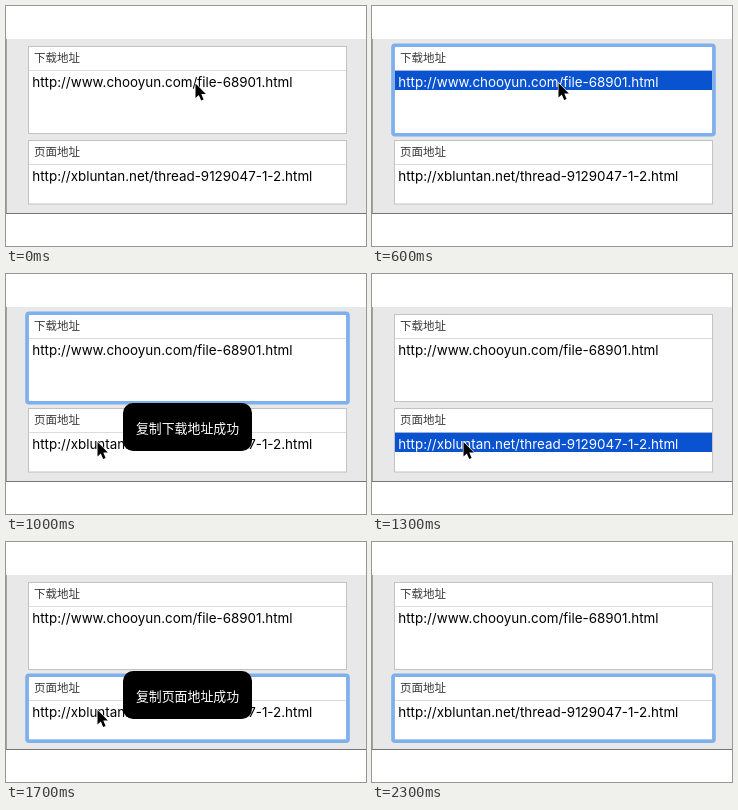
An HTML page that plays this animation: 360 px wide and 240 px high, repeating every 2.4 s.

```html
<!DOCTYPE html>
<html lang="zh-CN">
<head>
<meta charset="utf-8">
<style>
html, body { margin: 0; width: 100%; height: 100%; overflow: hidden; background: #fff; }
svg { display: block; width: 100vw; height: 100vh; }
text { white-space: pre; }
.panel { fill: #fff; stroke: #c2c2c2; }
.rule { stroke: #dcdcdc; }
.label { font: 11.5px "Noto Sans CJK SC", "Noto Sans CJK", sans-serif; fill: #3a3a3a; }
.url { font: 13.4px Inter, "Open Sans", sans-serif; fill: #000; }
.row { fill: #0a53d0; }
.ring { fill: none; stroke: #7fb0ee; stroke-width: 3.6; }
.toast { font: 500 12.9px "Noto Sans CJK SC", "Noto Sans CJK", sans-serif; fill: #fff; text-anchor: middle; }
</style>
</head>
<body>
<svg viewBox="0 0 360 240">
  <rect y="33" width="360" height="174" fill="#e8e8e8"/>
  <rect y="33" width="1" height="175" fill="#a3a3a3"/>
  <rect y="207" width="360" height="1" fill="#747474"/>
  <g id="panels"></g>
  <g id="toast">
    <rect x="117" y="129" width="129" height="48" rx="10"/>
    <text id="message" class="toast" x="181.5" y="158.7"></text>
  </g>
  <path id="cursor" d="M0 0V14.6L3.3 11.5L5.7 17L8.1 16L5.8 10.6H10.4Z" stroke="#fff" stroke-width="1.2" stroke-linejoin="round" paint-order="stroke"/>
</svg>
<script>
const LOOP = 2400, STEP = 100;
const $ = id => document.getElementById(id);

const panels = [
  { top: 40.5, height: 87, label: "下载地址", url: "http://www.chooyun.com/file-68901.html",
    ring: [200, 1300], row: [500, 800], toast: [800, 1300] },
  { top: 134.5, height: 63.5, label: "页面地址", url: "http://xbluntan.net/thread-9129047-1-2.html",
    ring: [1400, LOOP], row: [1300, 1500], toast: [1500, 2000] }
];

// Cursor tip: time, x, y
const path = [
  [0, 189.5, 77.5], [300, 191.5, 79], [600, 186.5, 77],
  [700, 186.5, 77], [1000, 91.5, 168], [LOOP, 91.5, 168]
];

function panelMarkup({ top, height, label, url }) {
  const rule = top + 24;
  return `<rect class="panel" x="22.5" y="${top}" width="318" height="${height}"/>
    <path class="rule" d="M23 ${rule}H340"/>
    <text class="label" x="28" y="${top + 15.9}">${label}</text>
    <rect class="row" x="23" y="${rule + 0.2}" width="317" height="19.3"/>
    <text class="url" x="26.3" y="${top + 40}">${url}</text>
    <rect class="ring" x="21" y="${top - 1.3}" width="321" height="${height + 2.6}" rx="2"/>`;
}

for (const panel of panels) {
  const g = document.createElementNS("http://www.w3.org/2000/svg", "g");
  g.innerHTML = panelMarkup(panel);
  $("panels").append(g);
  panel.parts = {
    row: g.querySelector(".row"),
    url: g.querySelector(".url"),
    ring: g.querySelector(".ring")
  };
}

const within = (t, [from, to]) => t >= from && t < to;
const show = (node, on) => node.setAttribute("visibility", on ? "visible" : "hidden");

function cursorAt(t) {
  const i = path.findIndex(p => p[0] > t);
  const [t0, x0, y0] = path[i - 1], [t1, x1, y1] = path[i];
  const k = (t - t0) / (t1 - t0), e = k * k * (3 - 2 * k);
  return [x0 + (x1 - x0) * e, y0 + (y1 - y0) * e];
}

function draw(time) {
  const t = Math.floor((time % LOOP) / STEP) * STEP;
  let opacity = 0;
  for (const { parts, ring, row, toast, label } of panels) {
    const selected = within(t, row);
    show(parts.ring, within(t, ring));
    show(parts.row, selected);
    parts.url.style.fill = selected ? "#fff" : "#000";
    if (within(t, toast)) {
      const edge = t === toast[0] || t === toast[1] - STEP;
      opacity = edge ? 0.5 : 1;
      $("message").textContent = `复制${label}成功`;
    }
  }
  $("toast").setAttribute("opacity", opacity);
  $("cursor").setAttribute("transform", `translate(${cursorAt(t)})`);
  show($("cursor"), t < 2300);
}

const start = performance.now();
function tick() {
  draw(performance.now() - start);
  requestAnimationFrame(tick);
}
tick();
</script>
</body>
</html>
```
